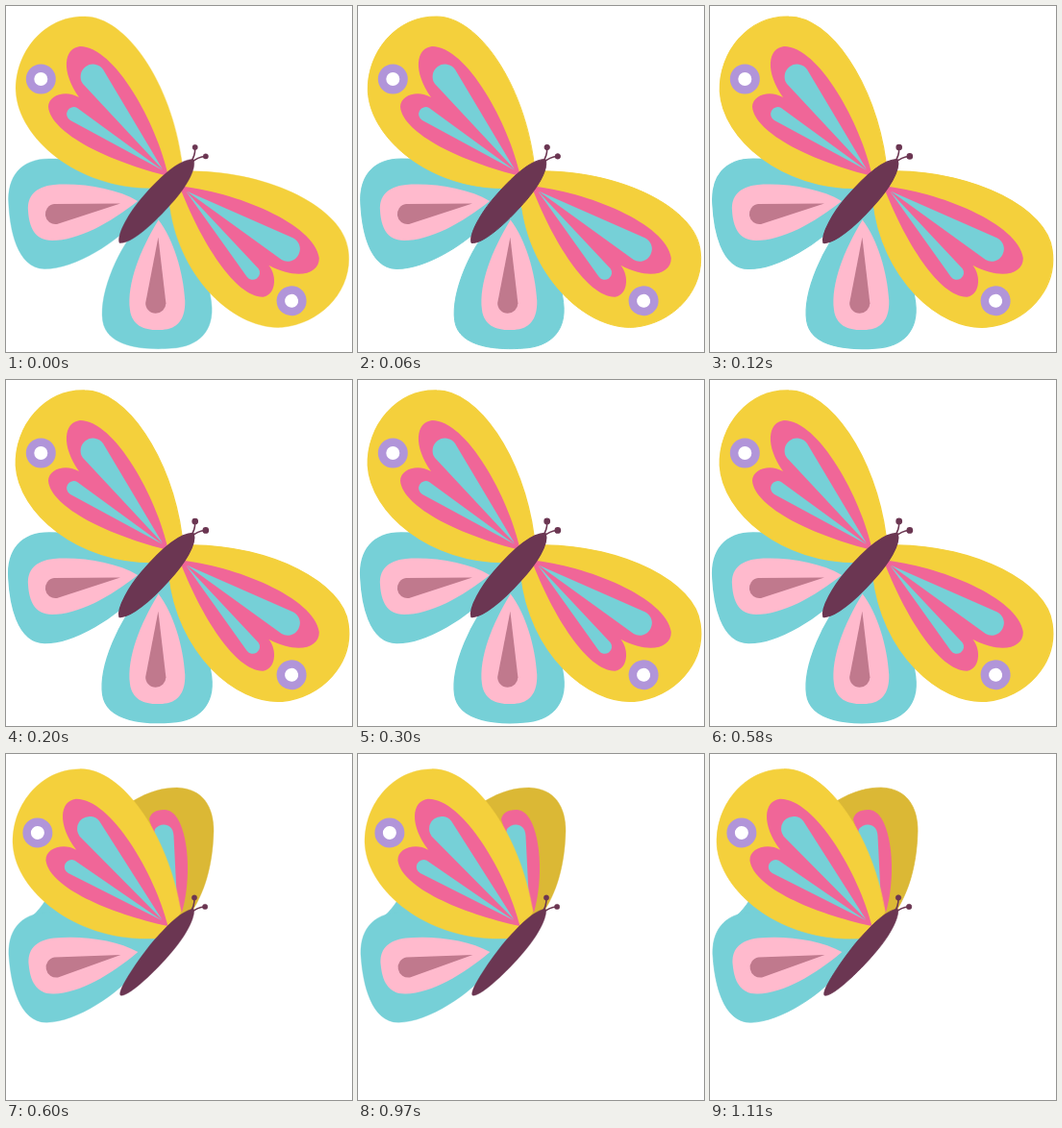
Recreate the animation shown at these times as an HTML page. Size 360 by 360 pixels, loop 1.13 s.

```html
<!DOCTYPE html>
<html>
<head>
<meta charset="utf-8">
<title>Butterfly</title>
<style>
html, body { margin: 0; width: 100%; height: 100%; overflow: hidden; background: #fff; }
svg { display: block; width: 100vw; height: 100vh; }
.edge { stroke-width: var(--grow, 0); stroke-linejoin: round; }
.yellow { fill: #f4d03c; stroke: #f4d03c; }
.shade { fill: #dbb835; stroke: #dbb835; }
.teal { fill: #76d0d7; stroke: #76d0d7; }
.body { fill: #6b3652; stroke: #6b3652; }
.rose { fill: #f06698; }
.sky { fill: #76d0d7; }
.feeler { fill: none; stroke: #6b3652; stroke-width: 1.6; }
</style>
</head>
<body>
<svg viewBox="0 0 360 360">
  <defs>
    <g id="hind">
      <path class="teal edge" d="M165 182C110 165 75 159 45 159C15 159 1 178 2.800 206C4 231 11 273 40 273.500C71 274 117 245 135 222Z"/>
      <path fill="#ffbacd" d="M137 203C115 190 80 184 50 186C30 188 22 198 23 213C24 230 30 244 48 244C75 244 108 226 137 203Z"/>
      <path fill="#c0798d" d="M119 205.500L50 206A10.500 10.500 0 1 0 53 227Z"/>
    </g>
    <g id="fore">
      <path class="yellow edge" d="M183 162C172 80 125 11 82 11C40 10 9 48 10.300 89C13 138 75 191 155 189.500L172 186Z"/>
      <path class="rose" d="M169 177C157 122 113 42 77 42C60 44 57 68 76 95C63 87 44 92 44 105C47 133 108 162 169 177Z"/>
      <path class="sky" d="M163 170L80 81A12.500 12.500 0 1 1 101 66Z"/>
      <path class="sky" d="M163 171L67 119A7 7 0 0 1 74 106Z"/>
      <circle cx="36.300" cy="76" r="15.500" fill="#b195d9"/>
      <circle cx="36.300" cy="76" r="7" fill="#fff"/>
    </g>
    <g id="feelers">
      <path class="feeler" d="M192 162Q197 157 196.700 147M193 163Q199 157 207.800 156.500"/>
      <circle class="body edge" cx="196.700" cy="147" r="2.700"/>
      <circle class="body edge" cx="207.800" cy="156.400" r="2.700"/>
    </g>
  </defs>

  <g id="open">
    <use href="#hind"/>
    <use href="#hind" transform="matrix(-.1233 -.9924 -.9924 .1233 377 333.500)"/>
    <use href="#fore"/>
    <use href="#fore" transform="matrix(-.1233 -.9924 -.9924 .1233 377 333.500)"/>
    <use href="#feelers"/>
    <path class="body edge" d="M118 246.500C115 237 129 214 141 200C159 179 180 159 195 159.500C199 170 186 191 169 209C151 229 129 248 118 246.500Z"/>
  </g>

  <g id="closed">
    <path class="shade edge" d="M130 50C150 38 165 35 178 35C205 36 216 55 216 80C215 120 205 145 194 163L160 180Z"/>
    <path class="rose" d="M183 165C196 118 187 58 165 58C155 58 150 62 149 68L165 120Z"/>
    <path class="sky" d="M178 155L174.500 85C174 71 160 71 155 78L150 100Z"/>
    <path class="teal edge" d="M28 168Q34 163 42 151L70 175Z"/>
    <g transform="rotate(-1.700 168 178) translate(-.500 2)">
      <use href="#hind"/>
      <use href="#fore"/>
    </g>
    <use href="#feelers" transform="translate(-.700 2.500)"/>
    <path class="body edge" d="M119 251C116 245 139 212 153 195C165 182 180 164 195 161C198 166 190 186 172.500 206C155 227 126 254 119 251Z"/>
  </g>
</svg>
<script>
const LOOP = 1130, FOLD = 600, SWELL = 970;
const open = document.getElementById("open");
const closed = document.getElementById("closed");
const start = performance.now();

// Edges thicken slightly while a pose is held.
const swell = (t, size) => size * (1 - Math.exp(-Math.max(0, t) / 80));

function draw() {
  const t = (performance.now() - start) % LOOP;
  const isOpen = t < FOLD;
  open.style.display = isOpen ? "" : "none";
  closed.style.display = isOpen ? "none" : "";
  const grow = 0.4 + (isOpen ? swell(t, 1) : swell(t - SWELL, 0.4));
  document.documentElement.style.setProperty("--grow", grow.toFixed(2) + "px");
  requestAnimationFrame(draw);
}
draw();
</script>
</body>
</html>
```
